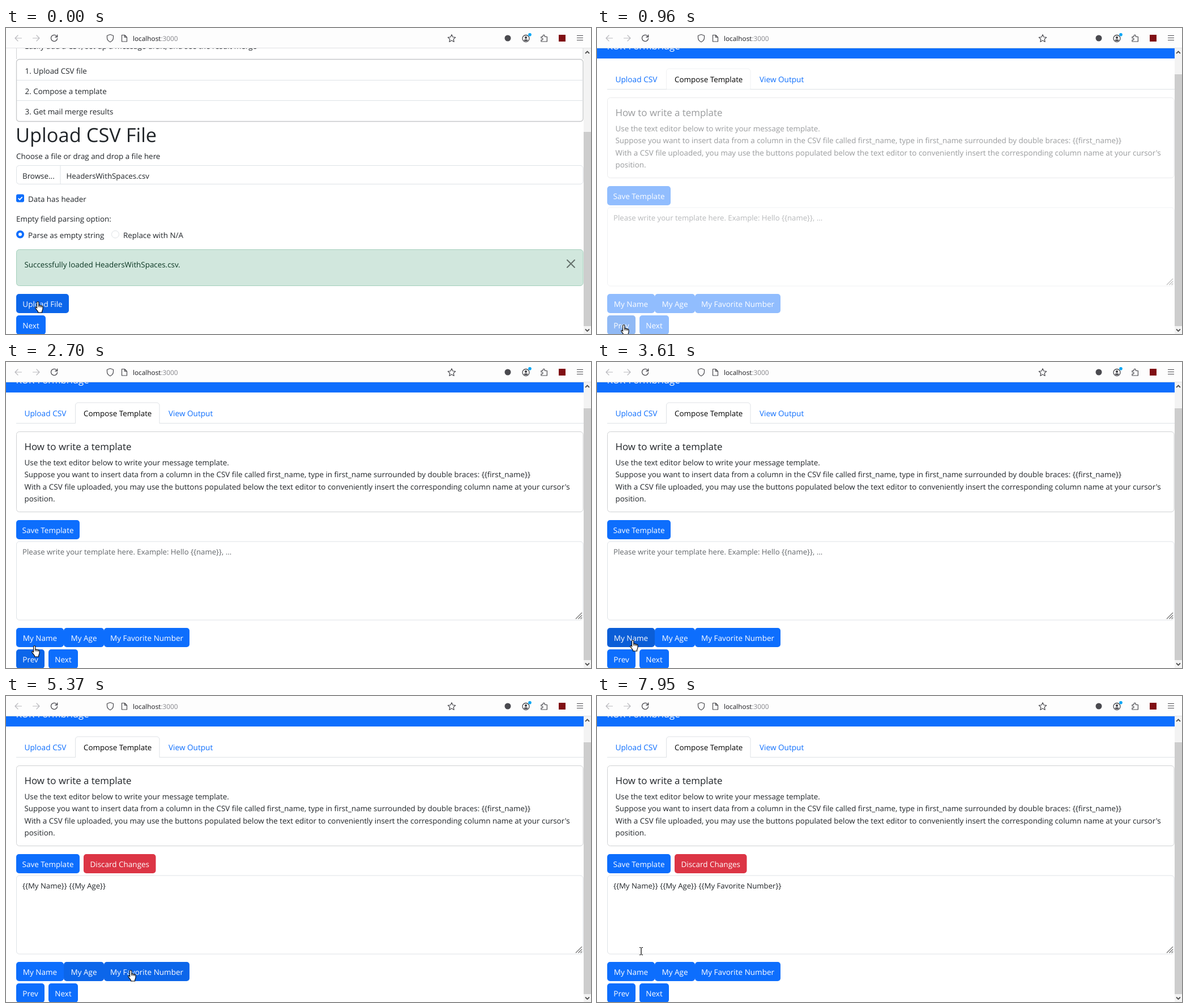
These frames come from a looping animation (1033 px wide and 542 px high, 8 s). An HTML page:

```html
<!DOCTYPE html>
<html lang="en">
<head>
<meta charset="utf-8">
<title>Mail merge demo</title>
<style>
html, body { margin: 0; width: 100%; height: 100%; overflow: hidden; background: #fff; }
svg { display: block; width: 1033px; height: 542px; }
text { font-family: "Open Sans", "Noto Sans", sans-serif; white-space: pre; text-rendering: geometricPrecision; }
</style>
</head>
<body>
<svg id="stage" viewBox="0 0 1033 542"></svg>
<script>
const LOOP = 8000;
const BLUE = '#0d6efd', INK = '#212529', LINE = '#dee2e6', CARD = '#cfd1d3', ICON = '#4a4a4f';

const text = (x, y, s, size = 13.4, fill = INK, more = '') =>
  `<text x="${x}" y="${y}" font-size="${size}" fill="${fill}" ${more}>${s}</text>`;
const box = (x, y, w, h, r, fill, stroke = 'none', more = '') =>
  `<rect x="${x}" y="${y}" width="${w}" height="${h}" rx="${r}" fill="${fill}" stroke="${stroke}" ${more}/>`;
const path = (d, stroke, width = 1, fill = 'none', more = '') =>
  `<path d="${d}" stroke="${stroke}" stroke-width="${width}" fill="${fill}" ${more}/>`;
const button = (id, x, y, w, label, fill = BLUE) =>
  box(x, y, w, 34, 5, fill, 'none', id ? `id="${id}"` : '') +
  text(x + w / 2, y + 23, label, 13.5, '#fff', 'text-anchor="middle"');
const scrollbar = top =>
  box(1020, 36, 13, 506, 0, '#f3f3f3') + box(1020, top, 13, 528 - top, 0, '#cdcdcd') +
  path('M1023 45l3.5-3.5l3.5 3.5M1023 533.5l3.5 3.5l3.5-3.5', '#505050', 1.8);

function toolbar() {
  const round = 'stroke-linecap="round" stroke-linejoin="round"';
  return box(0, 0, 1033, 36, 0, '#fdfdfd') + path('M0 35.5H1033', '#e1e1e3') +
    path('M27.5 18H16M21 13l-5 5l5 5M47.5 18H59M54 13l5 5l-5 5', '#b9b9bd', 1.2, 'none', round) +
    path('M90 15.3A5.6 5.6 0 1 0 90.6 18.6M90.7 12.2V16H86.8', ICON, 1.3, 'none', round) +
    path('M184 11.5l5.5 2v3.7c0 3.7-2.2 6-5.5 7.6c-3.3-1.6-5.5-3.9-5.5-7.6v-3.7Z', ICON, 1.2, 'none', round) +
    path('M204.5 12.5h5l4 4v7.5h-9ZM209.5 12.5v4h4', ICON, 1.2, 'none', round) +
    text(224, 23, 'localhost<tspan fill="#85858a">:3000</tspan>', 11.8, '#1c1c20') +
    path('M787 11.7l2 4.3l4.7 .6l-3.5 3.2l.9 4.6l-4.1-2.3l-4.1 2.3l.9-4.6l-3.5-3.2l4.7-.6Z', ICON, 1.2, 'none', round) +
    `<circle cx="886" cy="18" r="5.5" fill="${ICON}"/>` +
    `<circle cx="918" cy="18.5" r="6" fill="none" stroke="${ICON}" stroke-width="1.3"/>` +
    `<circle cx="918" cy="17" r="2.2" fill="${ICON}"/>` +
    path('M914.3 21.6c.6-1.8 6.8-1.8 7.4 0l-1.7 1.4h-4Z', 'none', 0, ICON) +
    '<circle cx="925" cy="11.8" r="2.8" fill="#00a5f5"/>' +
    path('M945 15.5h3v-1.5a1.7 1.7 0 0 1 3.4 0v1.5h4v8.5h-10.4v-2.8h1.5a1.6 1.6 0 0 0 0-3.2h-1.5Z', ICON, 1.2, 'none', round) +
    box(976, 12, 12, 12, 0, '#800f14') +
    path('M1008 13.5h11M1008 17.5h11M1008 21.5h11', ICON, 1.2);
}

function uploadView() {
  const steps = ['1. Upload CSV file', '2. Compose a template', '3. Get mail merge results'];
  return scrollbar(184) +
    path('M18.5 36V55M1019 36V55', CARD) +
    text(33, 36.8, 'Easily add a CSV, set up a message draft, and see the result merge') +
    box(18.5, 55.5, 1000.5, 110, 5, '#fff', '#c6c8ca', 'stroke-width="1.3"') +
    path('M19 92.5H1019M19 128.5H1019', LINE) +
    steps.map((s, i) => text(33.5, 80.5 + i * 36.2, s)).join('') +
    text(17, 201.5, 'Upload CSV File', 34.4) +
    text(18, 231.5, 'Choose a file or drag and drop a file here') +
    box(18.5, 243.5, 1000.5, 33, 5, '#fff', LINE) +
    path('M96 244V276', LINE) +
    text(29, 266.5, 'Browse...') +
    text(106.5, 266.5, 'HeadersWithSpaces.csv', 13.3) +
    box(18, 294.5, 14, 14, 3, BLUE) +
    path('M21.7 301.7l2.5 2.5l4.5-4.8', '#fff', 1.8) +
    text(39, 307.5, 'Data has header') +
    text(18, 343, 'Empty field parsing option:') +
    `<circle cx="25" cy="365.5" r="7" fill="${BLUE}"/><circle cx="25" cy="365.5" r="3" fill="#fff"/>` +
    text(39, 371.5, 'Parse as empty string') +
    `<circle cx="193" cy="365.5" r="6.5" fill="#fff" stroke="${LINE}"/>` +
    text(207, 371.5, 'Replace with N/A') +
    box(18.5, 392.5, 1000.5, 64, 5, '#d1e7dd', '#a3cfbb') +
    text(32.5, 423.5, 'Successfully loaded HeadersWithSpaces.csv.', 13.4, '#0a3622') +
    path('M991 411l13 13M1004 411l-13 13', '#64706b', 2, 'none', 'stroke-linecap="round"') +
    button('upload', 18, 471, 93, 'Upload File') +
    button('next', 18, 509, 52, 'Next');
}

function composeView() {
  return scrollbar(82) +
    box(0, 36, 1020, 18, 0, BLUE) +
    text(17.5, 38.2, 'KUR-Formbridge', 16.7, '#fff') +
    path('M18 108.5H1020', LINE) +
    `<g id="tab">${path('M122.5 109V77a5 5 0 0 1 5-5H266a5 5 0 0 1 5 5V109', LINE, 1, '#fff')}</g>` +
    text(32.5, 96, 'Upload CSV', 13.7, BLUE) +
    text(137, 96, 'Compose Template', 13.4, '#000') +
    text(287, 96, 'View Output', 13.6, BLUE) +
    '<g id="pane">' +
    box(18.5, 123.5, 1000.5, 142, 5, '#fff', CARD) +
    text(32.5, 156, 'How to write a template', 16.9) +
    text(32.5, 183, 'Use the text editor below to write your message template.') +
    text(32.5, 204, 'Suppose you want to insert data from a column in the CSV file called first_name, type in first_name surrounded by double braces: {{first_name}}') +
    text(32.5, 225.5, "With a CSV file uploaded, you may use the buttons populated below the text editor to conveniently insert the corresponding column name at your cursor's", 13.45) +
    text(32.5, 246.5, 'position.') +
    button('', 18, 280, 112, 'Save Template') +
    `<g id="discard">${button('', 137, 280, 127.5, 'Discard Changes', '#dc3545')}</g>` +
    box(18.5, 318, 1000.5, 139, 5, '#fff', LINE) +
    path('M1006 455l11-11M1010.5 455l6.5-6.5M1014.5 455l2.5-2.5', '#6d6d6d', 1.1) +
    text(29, 340.5, '', 13.18, INK, 'id="draft"') +
    button('name', 18, 471, 84, 'My Name') +
    button('age', 102, 471, 71, 'My Age') +
    button('number', 173, 471, 151, 'My Favorite Number') +
    button('prev', 18, 509, 50, 'Prev') +
    button('', 75, 509, 52, 'Next') + '</g>';
}

const hand = path('M5.2 .7C6.2 .7 6.8 1.4 6.8 2.3V7.2C7.2 6.6 9 6.7 9.3 7.8C9.8 7.2 11.5 7.4 11.8 8.5C12.6 8 14 8.5 14 9.9V13.5C14 15.5 12.6 16.5 12.6 18.5V20H5.6V18.6C4.8 17 2.4 14.7 1 12.2C.3 10.8 1.8 9.8 2.8 10.8L3.6 11.7V2.3C3.6 1.4 4.2 .7 5.2 .7Z', '#000', 1.1, '#fff') +
  path('M6.8 7.2V10.5M9.3 7.8V10.8M11.8 8.5V11', '#000');
const beam = path('M-3-6.5H-.7M.7-6.5H3M0-6V6M-3 6.5H-.7M.7 6.5H3', '#000', 1.2);

const stage = document.getElementById('stage');
stage.innerHTML =
  `<rect width="1033" height="542" fill="#fff"/><g id="view1">${uploadView()}</g><g id="view2">${composeView()}</g>` +
  toolbar() + `<g id="hand">${hand}</g><g id="beam">${beam}</g>`;
const $ = id => document.getElementById(id);

// Pointer stops: time, x, y, hovered button ('' = none, 'I' = text caret)
const stops = [
  [0, 51, 484, 'upload'], [160, 51, 484, 'upload'],
  [410, 49, 491, 'upload'], [535, 45, 510, 'next'], [660, 42, 525, 'next'],
  [960, 42, 525, 'prev'], [1110, 42, 525, 'prev'],
  [1500, 253, 347, 'I'], [1500, 253, 347, 'I'], [1800, 165, 394, 'I'], [1920, 82, 441, 'I'],
  [2060, 62, 509, 'prev'], [2185, 50, 520, 'prev'], [2310, 43, 523, 'prev'],
  [2580, 43, 516, 'prev'], [2700, 45, 502, ''], [2820, 48, 497, 'name'], [2940, 51, 492, 'name'],
  [3470, 52, 492, 'name'], [3610, 58, 492, 'name'],
  [4020, 68, 494, 'name'], [4150, 98, 495, 'age'], [4270, 110, 495, 'age'],
  [4420, 120, 495, 'age'], [4560, 131, 491, 'age'],
  [5120, 145, 490, 'age'], [5245, 157, 488, 'age'], [5370, 215, 485, 'number'],
  [5510, 238, 484, 'number'], [5770, 241, 483, 'number'],
  [7410, 140, 503, ''], [7530, 37, 520, 'prev'],
  [7680, 137, 350, 'I'], [7830, 147, 327, 'I'], [7950, 78, 452, 'I']
];
const inserts = [[3900, '{{My Name}}'], [4970, '{{My Age}}'], [6310, '{{My Favorite Number}}']];
const buttons = ['upload', 'next', 'name', 'age', 'number', 'prev'];

const show = (id, on) => $(id).setAttribute('display', on ? 'inline' : 'none');
const mix = k => `rgb(${13 - 2 * k},${110 - 16 * k},${253 - 38 * k})`;

function draw(t) {
  const i = stops.findLastIndex(s => s[0] <= t);
  const [, x, y, over] = stops[i];
  const before = stops[(i + stops.length - 1) % stops.length][3];
  // A button is halfway through its colour change on the first stop after a change
  for (const b of buttons) $(b).setAttribute('fill', mix(((over === b) + (before === b)) / 2));

  show('view1', t < 960);
  show('view2', t >= 960);
  const fade = t < 1110 ? 0.45 : 1;
  $('pane').setAttribute('opacity', fade);
  $('tab').setAttribute('opacity', fade);

  const draft = inserts.filter(s => s[0] <= t).map(s => s[1]).join(' ');
  $('draft').textContent = draft || 'Please write your template here. Example: Hello {{name}}, ...';
  $('draft').setAttribute('fill', draft ? INK : '#64686c');
  show('discard', draft);

  const cursor = over === 'I' ? 'beam' : 'hand';
  show('hand', cursor === 'hand');
  show('beam', cursor === 'beam');
  $(cursor).setAttribute('transform', `translate(${x} ${y})`);
}

const start = performance.now();
function tick() {
  draw((performance.now() - start) % LOOP);
  requestAnimationFrame(tick);
}
tick();
</script>
</body>
</html>
```
